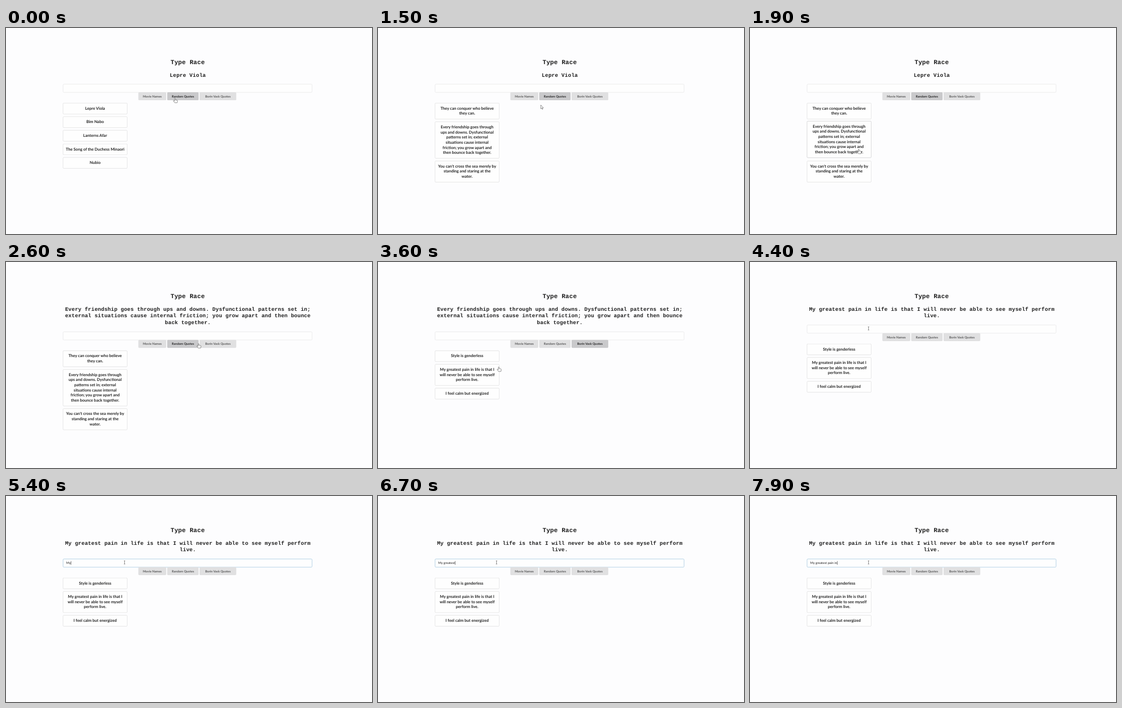
An HTML page for the animation above (8 s loop, 690 px wide and 388 px high).

```html
<!DOCTYPE html>
<html lang="en">
<head>
<meta charset="utf-8">
<title>Type Race</title>
<style>
  html, body { margin: 0; width: 100%; height: 100%; overflow: hidden; background: #fdfdfe; }
  svg { display: block; width: 690px; height: 388px; }
  text { font-family: Lato, sans-serif; fill: #222; text-anchor: middle; text-rendering: geometricPrecision; }
  .title, .prompt { font-family: "Liberation Mono", "Noto Sans Mono", monospace; font-weight: 700; fill: #1e1e1e; }
  .title { font-size: 11.67px; letter-spacing: .2px; }
  .prompt { font-size: 10px; letter-spacing: .17px; }
  .field { fill: #fefefe; stroke: #e3e3e4; stroke-width: .7; }
  .field.focus { stroke: #94bfdc; }
  .typed { font-size: 6px; text-anchor: start; }
  .button rect { fill: #e0e0e1; }
  .button text { font-size: 5.83px; font-weight: 700; fill: #5a5a5b; }
  .button.on rect { fill: #c9c9cb; }
  .button.on text { fill: #29292a; }
  .card rect { fill: #fefefe; stroke: #e2e2e3; stroke-width: .6; filter: drop-shadow(0 .4px .4px #d8d8d9); }
  .card.up rect { stroke: #d6d6d7; filter: drop-shadow(0 .4px .6px #bcbdbd); }
  .card text { font-size: 7.5px; font-weight: 700; }
  .cursor { fill: #fff; stroke: #444; stroke-width: .6; stroke-linejoin: round; }
</style>
</head>
<body>
<svg id="stage" viewBox="0 0 690 388"></svg>
<script>
const LOOP = 8000, STEP = 100, ROW = 12.85, LINE = 9.64;
const TYPE_START = 5200, KEY_TIME = 150, FOCUS_TIME = 4500, BLINK = 500;
const stage = document.getElementById('stage');

const movies = ['Lepre Viola', 'Bim Nabo', 'Lanterns Afar', 'The Song of the Duchess Minaori', 'Nubio'];
const sayings = [
  'They can conquer who believe|they can.',
  'Every friendship goes through|ups and downs. Dysfunctional|patterns set in; external|situations cause internal|friction; you grow apart and|then bounce back together.',
  'You can\'t cross the sea merely by|standing and staring at the|water.'
];
const starQuotes = [
  'Style is genderless',
  'My greatest pain in life is that I|will never be able to see myself|perform live.',
  'I feel calm but energized'
];
const friendship = [
  'Every friendship goes through ups and downs. Dysfunctional patterns set in;',
  'external situations cause internal friction; you grow apart and then bounce',
  'back together.'
];
const pain = ['My greatest pain in life is that I will never be able to see myself perform', 'live.'];

const buttons = [['Movie Names', 52.6], ['Random Quotes', 59.2], ['Borin Vask Quotes', 69.2]];

// each event changes part of the page state
const events = [
  { t: 0, prompt: ['Lepre Viola'], list: movies, focus: 'Random Quotes' },
  { t: 300, list: sayings },
  { t: 2200, prompt: friendship, focus: '' },
  { t: 3000, focus: 'Borin Vask Quotes' },
  { t: 3200, list: starQuotes },
  { t: 3900, prompt: pain, focus: '' },
  { t: FOCUS_TIME, focus: 'field' }
];

// eased pointer moves to a hot spot
const home = { x: 318.5, y: 132 };
const moves = [
  { from: 600, to: 800, x: 318.7, y: 135.4 },
  { from: 1400, to: 1900, x: 205, y: 228 },
  { from: 2300, to: 2600, x: 362.8, y: 153.3 },
  { from: 2600, to: 2800, x: 392, y: 154 },
  { from: 3200, to: 3600, x: 227.6, y: 197.3 },
  { from: 3600, to: 3800, x: 221, y: 190.5 },
  { from: 4000, to: 4400, x: 223.5, y: 125.1 }
];
const shapes = {
  arrow: 'M0 0V7.2L1.7 5.7L2.8 8.2L3.9 7.7L2.8 5.3H5Z',
  hand: 'M-.7.8Q0-.6.8.8V3.4L3.8 4Q4.8 4.2 4.8 5.2L4.2 8.8H-.4L-3 5.4Q-2.8 4.2-1.6 4.8L-.7 5.6Z',
  beam: 'M-1.3-3H1.3M0-3V3M-1.3 3H1.3'
};

const stateAt = t => Object.assign({}, ...events.filter(e => e.t <= t));
const typedCount = t => Math.max(0, 1 + Math.floor((t - TYPE_START) / KEY_TIME));
const caretAt = t => t >= TYPE_START || t >= FOCUS_TIME && (t - FOCUS_TIME) % (2 * BLINK) < BLINK;
const ease = f => f * f * (3 - 2 * f);

function pointer(t) {
  return moves.reduce((p, m) => {
    const f = ease(Math.min(1, Math.max(0, (t - m.from) / (m.to - m.from))));
    return { x: p.x + (m.x - p.x) * f, y: p.y + (m.y - p.y) * f };
  }, home);
}

const inside = (p, b) => p.x >= b.x && p.x <= b.x + b.w && p.y >= b.y && p.y <= b.y + b.h;
const rect = (b, cls = '') =>
  `<rect class="${cls}" x="${b.x}" y="${b.y}" width="${b.w}" height="${b.h}" rx="1.7"/>`;
const text = (s, x, y, cls = '') => `<text class="${cls}" x="${x}" y="${y}">${s}</text>`;

function layButtons(y) {
  let x = 249.5;
  return buttons.map(([label, w]) => {
    const b = { label, x, y, w, h: 15 };
    x += w + 1.8;
    return b;
  });
}

function layCards(list, y) {
  return list.map(s => {
    const lines = s.split('|');
    const card = { lines, x: 107.5, y, w: 121, h: 20.4 + LINE * (lines.length - 1) };
    y += card.h + 5.2;
    return card;
  });
}

function drawButton(b, on) {
  return `<g class="button ${on ? 'on' : ''}">${rect(b)}${text(b.label, b.x + b.w / 2, b.y + 9.6)}</g>`;
}

function drawCard(card, up) {
  const lines = card.lines.map((s, i) => text(s, 168, card.y + 12.2 + LINE * i)).join('');
  return `<g class="card ${up ? 'up' : ''}" transform="translate(0 ${up ? -1.25 : 0})">${rect(card)}${lines}</g>`;
}

function draw(t) {
  const { prompt, list, focus } = stateAt(t), dy = ROW * (prompt.length - 1);
  const p = pointer(t), before = pointer(t - STEP);
  const field = { x: 107.6, y: 105.8 + dy, w: 469.4, h: 15.4 };
  const row = layButtons(121.1 + dy), cards = layCards(list, 141.5 + dy);
  const typed = pain[0].slice(0, typedCount(t)).replace(/ /g, '\u00a0');
  const kind = inside(p, field) ? 'beam' : [...row, ...cards].some(b => inside(p, b)) ? 'hand' : 'arrow';

  stage.innerHTML =
    text('Type Race', 342.6, 67.6, 'title') +
    prompt.map((s, i) => text(s, 342.8, 91.5 + ROW * i, 'prompt')).join('') +
    rect(field, focus === 'field' ? 'field focus' : 'field') +
    text(typed, 113.6, 115.3 + dy, 'typed') +
    row.map(b => drawButton(b, focus === b.label || inside(p, b))).join('') +
    cards.map(c => drawCard(c, inside(before, c))).join('') +
    `<path class="cursor" transform="translate(${p.x} ${p.y})" d="${shapes[kind]}"/>`;

  if (caretAt(t)) {
    const end = typed ? stage.querySelector('.typed').getComputedTextLength() : 0;
    stage.innerHTML += `<rect x="${113.8 + end}" y="${109.7 + dy}" width=".6" height="7" fill="#222"/>`;
  }
}

const start = performance.now();
let shown = -1;
function tick() {
  const t = Math.floor((performance.now() - start) % LOOP / STEP) * STEP;
  if (t !== shown) draw(shown = t);
  requestAnimationFrame(tick);
}
tick();
</script>
</body>
</html>
```
